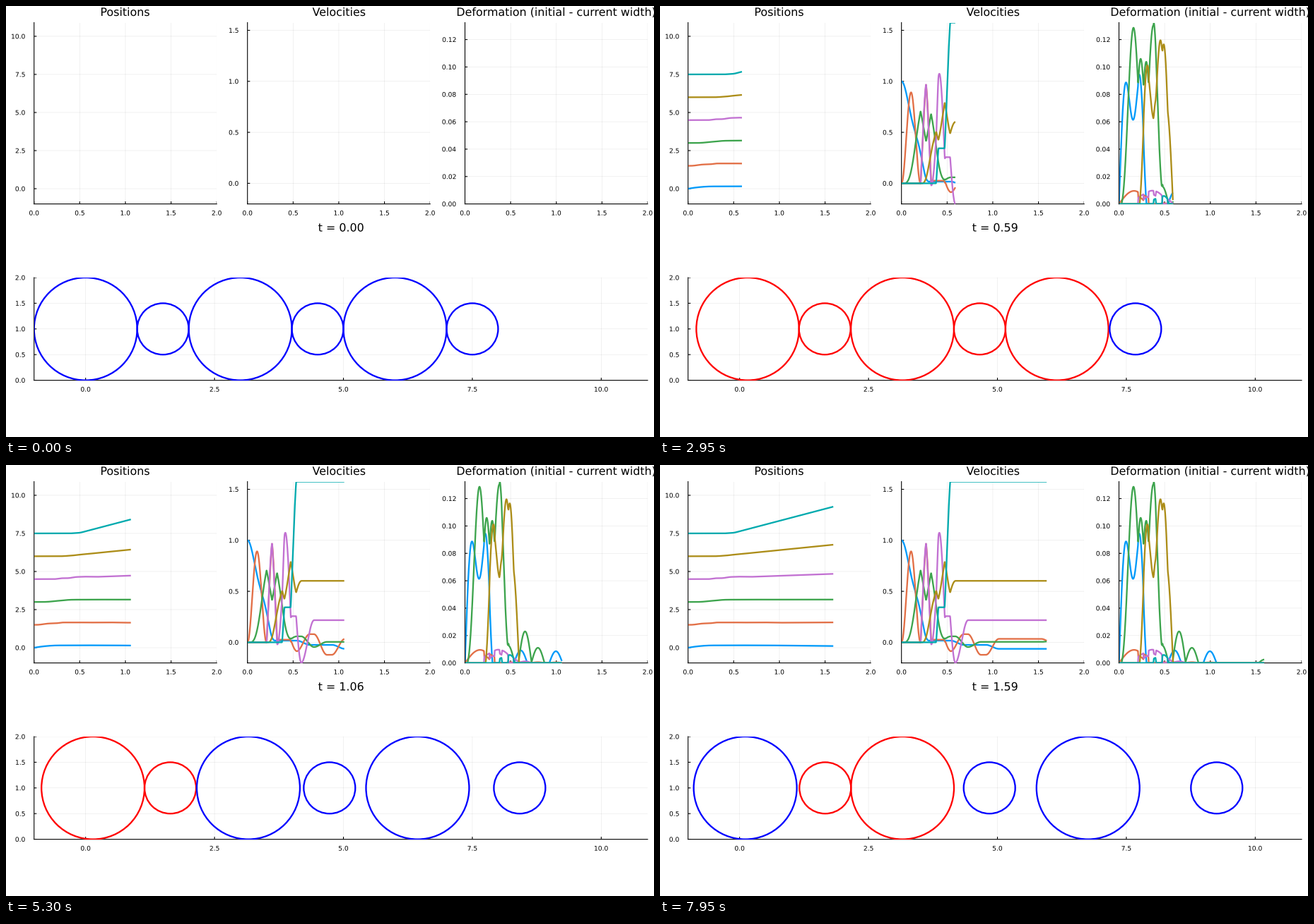
These frames come from a looping animation (917 px wide and 611 px high, 8 s). A matplotlib script:

```python
import itertools

import matplotlib.pyplot as plt
import numpy as np
from matplotlib.animation import FuncAnimation
from matplotlib.patches import Ellipse, PathPatch
from matplotlib.textpath import TextPath
from matplotlib.transforms import Affine2D

W, H, DPI = 917, 611, 64
PT = 72 / DPI  # points per pixel
FRAMES, INTERVAL = 160, 50
DT, SUB, PER_FRAME = 1e-4, 10, 10  # physics step, steps per sample, samples per frame

COLORS = ["#009afa", "#e26f46", "#3da44d", "#c271d2", "#ac8d18", "#00aaae"]
RADIUS = np.array([1, 0.5] * 3)
START = np.array([0, 1.5, 3, 4.5, 6, 7.5])
MASS = RADIUS**2
STIFF = np.array([25.0, 500.0] * 3)

plt.rcParams["path.snap"] = False


def contact_solvers():
    """Compliance of the five contacts, and its inverse for every set of closed ones."""
    c = 1 / (4 * STIFF)
    comp = np.diag(c[:-1] + c[1:]) + np.diag(c[1:-1], 1) + np.diag(c[1:-1], -1)
    solvers = []
    for closed in itertools.product([False, True], repeat=5):
        inv = np.zeros((5, 5))
        idx = np.flatnonzero(closed)
        if len(idx):
            inv[np.ix_(idx, idx)] = np.linalg.inv(comp[np.ix_(idx, idx)])
        solvers.append(inv)
    return comp, np.array(solvers)


def simulate():
    """Elastic balls in a row; contacts push but never pull."""
    comp, solvers = contact_solvers()

    def forces(shift):
        push = shift[:-1] - shift[1:]
        force = solvers @ push
        gap = force @ comp - push
        valid = np.minimum(force * 0.01, gap).min(axis=1)
        best = force[valid.argmax()]
        return np.concatenate(([0.0], best, [0.0]))

    shift = np.zeros(6)
    vel = np.array([1.0, 0, 0, 0, 0, 0])
    f = forces(shift)
    pos, speed, squeeze = [], [], []
    samples = FRAMES * PER_FRAME + 1
    for step in range(samples * SUB):
        if step % SUB == 0:
            pos.append(START + shift)
            speed.append(vel.copy())
            squeeze.append((f[:-1] + f[1:]) / (2 * STIFF))
        vel += (f[:-1] - f[1:]) / MASS * DT / 2
        shift = shift + vel * DT
        f = forces(shift)
        vel += (f[:-1] - f[1:]) / MASS * DT / 2
    return np.array(pos), np.array(speed), np.array(squeeze)


fig = plt.figure(figsize=(W / DPI, H / DPI), dpi=DPI, facecolor="white")


def text_path(x, y, text, size, align):
    """Text outline in pixels; align is 0.5 for centred, 1 for right-aligned ink."""
    path = TextPath((0, 0), text, size=size, prop={"family": "DejaVu Sans"})
    box = path.get_extents()
    to_figure = Affine2D().translate(x - box.x0 - align * box.width, H - y)
    return to_figure.scale(1 / W, 1 / H).transform_path(path)


def label(x, y, text, size=9.1, align=0.5):
    patch = PathPatch(text_path(x, y, text, size, align), facecolor="black",
                      linewidth=0, transform=fig.transFigure)
    return fig.add_artist(patch)


def panel(box, xlim, ylim, xticks, yticks, digits):
    """Axes in a pixel box (left, top, right, bottom) with inner ticks."""
    left, top, right, bottom = box
    width, height = right - left, bottom - top
    ax = fig.add_axes([left / W, 1 - bottom / H, width / W, height / H])
    ax.set(xlim=xlim, ylim=ylim, xticks=xticks, yticks=yticks)
    ax.set_facecolor("none")
    ax.set_axisbelow(True)
    ax.grid(color="black", alpha=0.1, linewidth=0.55 * PT)
    ax.tick_params(length=0, labelbottom=False, labelleft=False)
    ax.spines[["top", "right"]].set_visible(False)
    ax.spines[["left", "bottom"]].set_linewidth(1.1 * PT)
    style = dict(color="black", linewidth=1.1 * PT, zorder=2)
    ax.vlines(xticks, 0, 3.6 / height, transform=ax.get_xaxis_transform(), **style)
    ax.hlines(yticks, 0, 3.6 / width, transform=ax.get_yaxis_transform(), **style)
    for v in xticks:
        px = left + (v - xlim[0]) / (xlim[1] - xlim[0]) * width
        label(px, bottom + 16, f"{v:.1f}")
    for v in yticks:
        py = bottom - (v - ylim[0]) / (ylim[1] - ylim[0]) * height
        label(left - 13, py + 3.4, f"{v:.{digits}f}", align=1)
    return ax


TOP, BOTTOM = 23.5, 280.6
half = np.arange(0, 2.1, 0.5)
charts = [
    panel((39.7, TOP, 298.2, BOTTOM), (0, 2), (-1, 10.9), half, np.arange(0, 10.1, 2.5), 1),
    panel((341.7, TOP, 600.2, BOTTOM), (0, 2), (-0.202, 1.576), half, np.arange(0, 1.6, 0.5), 1),
    panel((649.5, TOP, 908, BOTTOM), (0, 2), (0, 0.1324), half, np.arange(0, 0.121, 0.02), 2),
]
stage = panel((39.7, 385, 908, 530.6), (-1, 10.9), (0, 2),
              np.arange(0, 10.1, 2.5), np.arange(0, 2.1, 0.5), 1)

TITLE = 15.9
label(168.9, 14, "Positions", TITLE)
label(471, 14, "Velocities", TITLE)
label(778.7, 14, "Deformation (initial - current width)", TITLE)
clock = label(473.9, 319.6, "t = 0.00", TITLE)

data = simulate()
times = np.arange(len(data[0])) * DT * SUB
curves = [[ax.plot([], [], color=c, linewidth=2.3 * PT, zorder=3,
                   solid_capstyle="butt", solid_joinstyle="round")[0] for c in COLORS]
          for ax in charts]
balls = [stage.add_patch(Ellipse((x, 1), 2 * r, 2 * r, fill=False, edgecolor="blue",
                                 linewidth=2.3 * PT, zorder=3))
         for x, r in zip(START, RADIUS)]


def draw(frame):
    now = frame * PER_FRAME
    end = now + 1 if frame else 0
    for lines, values in zip(curves, data):
        for i, line in enumerate(lines):
            line.set_data(times[:end], values[:end, i])
    pos, _, squeeze = data
    for i, ball in enumerate(balls):
        ball.set_center((pos[now, i], 1))
        ball.set_width(2 * RADIUS[i] - squeeze[now, i])
        ball.set_edgecolor("red" if squeeze[now, i] > 1e-7 else "blue")
    clock.set_path(text_path(473.9, 319.6, f"t = {times[now]:.2f}", TITLE, 0.5))
    return [clock, *balls, *itertools.chain(*curves)]


anim = FuncAnimation(fig, draw, frames=FRAMES, interval=INTERVAL, init_func=lambda: draw(0),
                     repeat=True, repeat_delay=0, cache_frame_data=False)
plt.show()
```
